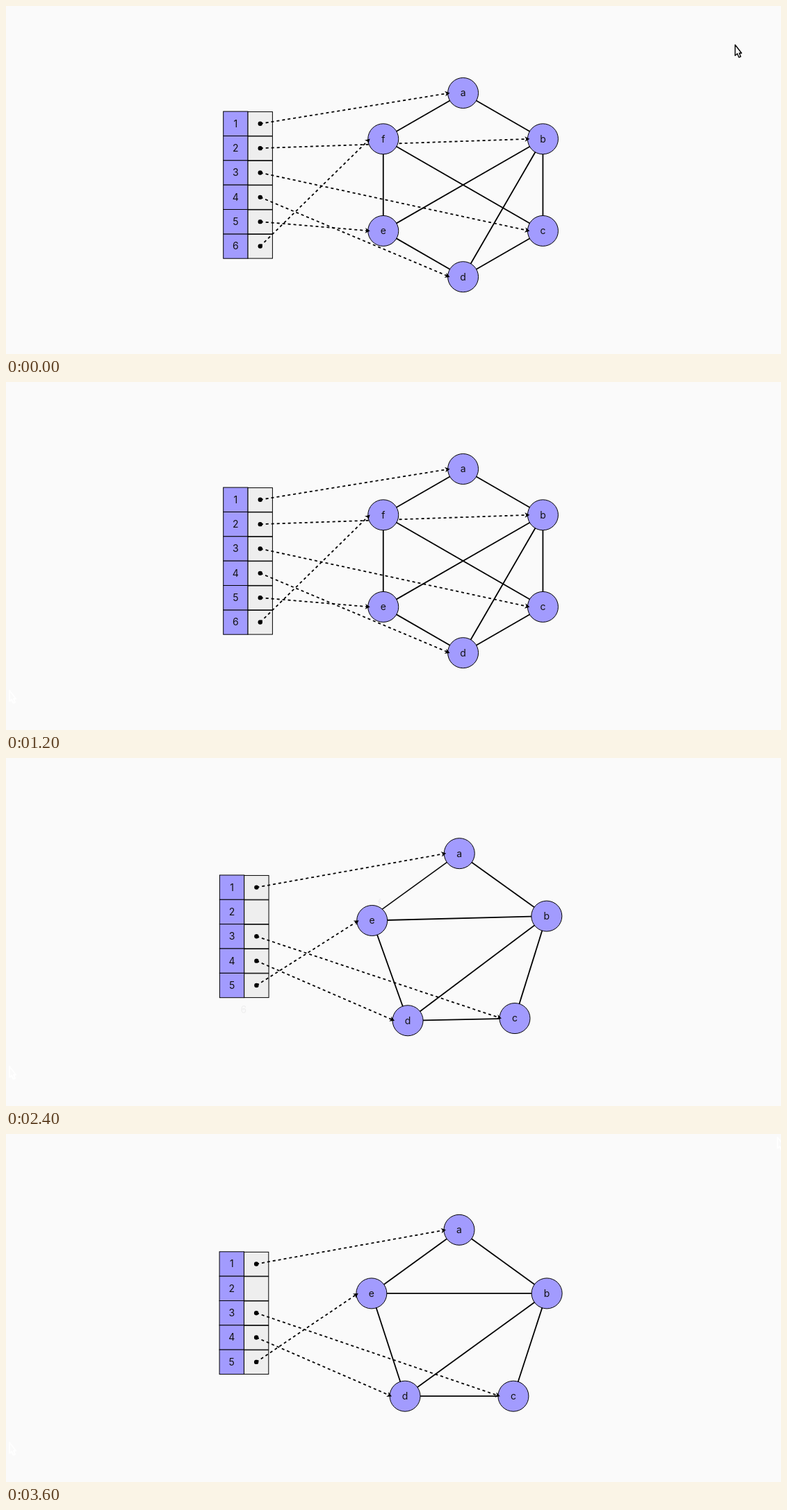
Write an HTML page that moves like this. It is 1115 by 502 pixels and loops after 4.3 s.

```html
<!DOCTYPE html>
<html lang="en">
<head>
<meta charset="utf-8">
<title>Graph vertex removal</title>
<style>
  html, body { margin: 0; width: 100%; height: 100%; overflow: hidden; background: #fafafa; }
  svg { display: block; width: 100%; height: 100%; }
  text { font: 14px Inter, sans-serif; text-anchor: middle; fill: #111; }
  .edge { stroke: #000; stroke-width: 1.8; }
  .link { stroke: #000; stroke-width: 1.8; stroke-dasharray: 4 4; }
  .node { fill: #a29bfe; stroke: #000; stroke-width: 1; }
  .slot { fill: #eee; stroke: #000; stroke-width: 1; }
  .arrow { fill: #fff; stroke: #000; stroke-width: 1.4; stroke-linejoin: round; }
  .ghost { fill: #fafafa; stroke: #fff; stroke-width: 2; stroke-linejoin: round; }
</style>
</head>
<body>
<svg id="stage" viewBox="0 0 1115 502"></svg>
<script>
const LOOP = 4300, STEP = 100;
const R = 22, CELL = 35.35, RADIUS = 132.6;
const SHIFT = [-5.6, 17.7];
const TABLE = [312.7, 152.1];
const stage = document.getElementById('stage');

const lerp = (a, b, k) => a + (b - a) * k;
const mix = (p, q, k) => [lerp(p[0], q[0], k), lerp(p[1], q[1], k)];
const add = (p, q, k = 1) => [p[0] + q[0] * k, p[1] + q[1] * k];

function ring(names, cx, cy) {
  const out = {};
  [...names].forEach((n, i) => {
    const a = i / names.length * 2 * Math.PI;
    out[n] = [cx + RADIUS * Math.sin(a), cy - RADIUS * Math.cos(a)];
  });
  return out;
}
const before = ring('abcdef', 657.6, 258.1);
const after = ring('abcde', 652, 270.9);
const kept = ['ab', 'bc', 'bd', 'be', 'cd', 'de'];
const dropped = ['af', 'cf', 'ef'];
const targets = 'abcdef';

// Places content drawn around the origin.
const group = (p, scale, opacity, body) => opacity <= 0 ? '' :
  `<g transform="translate(${p[0]} ${p[1]}) scale(${scale})" opacity="${opacity}">${body}</g>`;

const line = (p, q, cls) =>
  `<line class="${cls}" x1="${p[0]}" y1="${p[1]}" x2="${q[0]}" y2="${q[1]}"/>`;

const label = (p, s, opacity = 1) =>
  `<text x="${p[0]}" y="${p[1] + 4.9}" opacity="${opacity}">${s}</text>`;

function head(p, q) {
  const a = Math.atan2(q[1] - p[1], q[0] - p[0]) * 180 / Math.PI;
  return `<path d="M0.5 0L-6.5 -3.8L-4.5 0L-6.5 3.8Z" transform="translate(${q[0]} ${q[1]}) rotate(${a})"/>`;
}

const shaft = (p, q) => line(p, q, 'link') + `<circle cx="${p[0]}" cy="${p[1]}" r="3.2"/>`;

const shrunk = (p, q, shift, scale, draw) => {
  const mid = mix(p, q, 0.5);
  return group(add(mid, shift), scale, scale, draw(add(p, mid, -1), add(q, mid, -1)));
};

const cells = (x, y) =>
  `<rect class="node" x="${x}" y="${y}" width="${CELL}" height="${CELL}"/>` +
  `<rect class="slot" x="${x + CELL}" y="${y + 0.5}" width="${CELL}" height="${CELL - 0.6}"/>`;

const dotAt = i => [TABLE[0] + CELL * 1.5, TABLE[1] + CELL * (i + 0.5)];
const portOf = p => [p[0] - 19.5, p[1]];

function drawGraph(k) {
  const move = [SHIFT[0] * k, SHIFT[1] * k];
  const rest = [-SHIFT[0] * (1 - k), -SHIFT[1] * (1 - k)];
  const out = 1 - k;
  const pos = {};
  for (const n in after) pos[n] = mix(before[n], after[n], k);
  const edge = (p, q) => line(p, q, 'edge');
  const origin = add(TABLE, move);
  let s = '', heads = '';

  for (const [a, b] of kept) s += edge(pos[a], pos[b]);
  for (const [a, b] of dropped) s += shrunk(before[a], before[b], move, out, edge);
  s += shrunk(after.a, after.e, rest, k, edge);

  const last = add([TABLE[0] + CELL, TABLE[1] + CELL * 5.5], move);
  s += group(last, out, out, cells(-CELL, -CELL / 2));
  if (out > 0) s += label([last[0] - CELL / 2 * out, last[1]], 6, out);
  for (let i = 0; i < 5; i++) {
    const y = origin[1] + i * CELL;
    s += cells(origin[0], y) + label([origin[0] + CELL / 2, y + CELL / 2], i + 1);
  }

  [...targets].forEach((n, i) => {
    if (i === 1 || i === 5) {
      const p = dotAt(i), q = portOf(before[n]);
      s += shrunk(p, q, move, out, shaft);
      heads += shrunk(p, q, move, out, head);
    } else {
      const p = add(dotAt(i), move), q = portOf(pos[n]);
      s += shaft(p, q);
      heads += head(p, q);
    }
  });

  const gone = add(before.f, move);
  s += group(gone, out, out, `<circle class="node" r="${R}"/>`);
  if (out > 0) s += label(gone, 'f', out);
  for (const n in pos) {
    s += `<circle class="node" cx="${pos[n][0]}" cy="${pos[n][1]}" r="${R}"/>` + label(pos[n], n);
  }
  return s + heads;
}

// Pointer keys: time, x, y of the tip.
const keys = [
  [0, 1049, 56], [100, 965, 82], [200, 650, 180], [300, 380, 262], [400, 365, 259],
  [600, 365, 259], [700, 345, 269], [800, 270, 308], [900, 160, 364], [1000, 65, 413],
  [1100, 5, 444],
  [2700, 241, 422], [2800, 470, 322], [2900, 671, 228], [3000, 835, 140],
  [3100, 945, 77], [3200, 999, 47], [3300, 1040, 31], [3400, 1078, 17], [3500, 1104, 8]
];

function tipAt(t) {
  if (t > 1100 && t < 2700 || t > 3500) return null;
  const i = keys.findIndex(k => k[0] >= t), b = keys[i];
  if (b[0] === t) return [b[1], b[2]];
  const a = keys[i - 1];
  return mix([a[1], a[2]], [b[1], b[2]], (t - a[0]) / (b[0] - a[0]));
}

const arrow = (p, cls) =>
  `<path class="${cls}" d="M0 0V15.5L3.2 12.8L5.4 18L8 17L6 12H9.3Z" transform="translate(${p[0]} ${p[1]})"/>`;

function drawPointer(t) {
  let s = '';
  if (t >= 1200) s += arrow([5, 445], 'ghost');
  if (t >= 3600) s += arrow([1110, 5], 'ghost');
  const tip = tipAt(t);
  if (tip) s += arrow(tip, 'arrow');
  if (t >= 400 && t <= 600) {
    s += group([tip[0] + 12, tip[1] + 13], 1, 1,
      '<circle r="5.2" fill="#d5eee4" stroke="#0d5845" stroke-width="1.5"/>' +
      `<circle r="2.6" fill="none" stroke="#218269" stroke-width="1.2" stroke-dasharray="6 2" transform="rotate(${t * 0.9})"/>`);
  }
  return s;
}

// The removal shows up already under way, then eases out.
function progress(t) {
  if (t < 2100) return 0;
  const u = Math.min(1, 0.186 + (t - 2100) / 667);
  return t >= 2600 ? 1 : 1 - (1 - u) ** 3;
}

let shown = -1;
function frame(now) {
  const t = Math.floor(now % LOOP / STEP) * STEP;
  if (t !== shown) {
    shown = t;
    stage.innerHTML = drawGraph(progress(t)) + drawPointer(t);
  }
  requestAnimationFrame(() => frame(performance.now() - start));
}
const start = performance.now();
frame(0);
</script>
</body>
</html>
```
